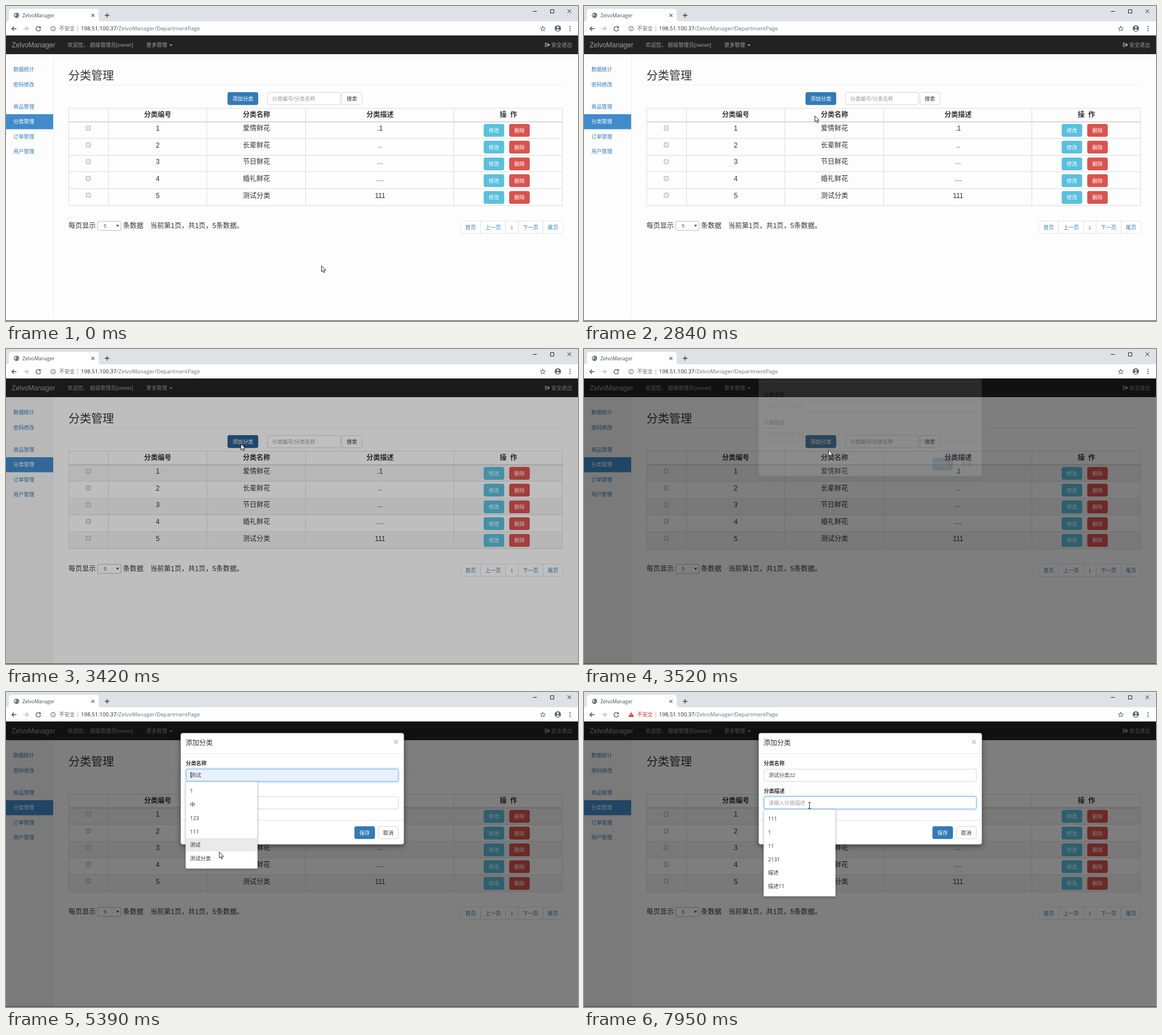
Animation of 1007x556 px, one loop 8000 ms. Source, as an HTML page:

```html
<!DOCTYPE html>
<html lang="zh-CN">
<head>
<meta charset="utf-8">
<title>分类管理</title>
<style>
html, body { margin: 0; width: 100%; height: 100%; overflow: hidden; background: #fdfdfd; }
svg { display: block; width: 100%; height: 100%; }
text { font-family: "Liberation Sans", "Noto Sans CJK SC", "Noto Sans CJK", sans-serif; white-space: pre; }
.ui { font-family: "Open Sans", "Noto Sans CJK SC", "Noto Sans CJK", sans-serif; }
.modal { filter: drop-shadow(0 3px 5px rgba(0,0,0,.45)); }
.focus { filter: drop-shadow(0 0 2px rgba(102,175,233,.8)); }
.list { filter: drop-shadow(0 1px 2px rgba(0,0,0,.3)); }
</style>
</head>
<body>
<svg id="stage" viewBox="0 0 1007 556"></svg>
<script>
const stage = document.getElementById('stage');
const LOOP = 8000, S = 9.2, H = 22.4, BLUE = '#337ab7';
const APP = 'ZelvoManager';

// Screen updates: [first, last, count]
const runs = [[0, 0, 1], [1180, 1750, 9], [1800, 1980, 3], [2040, 2490, 8], [2730, 3360, 10],
  [3420, 3520, 3], [3600, 3800, 4], [3870, 4370, 10], [4430, 4430, 1], [4860, 4860, 1],
  [5110, 5390, 6], [5450, 5510, 2], [5700, 6450, 14], [6530, 6650, 3], [6830, 7590, 13], [7780, 7950, 4]];
const ticks = runs.flatMap(([a, b, n]) =>
  Array.from({length: n}, (_, i) => Math.round(a + (n > 1 ? (b - a) * i / (n - 1) : 0))));

// Pointer path: [time, x, y]
const path = [[1110, 555, 458], [1750, 378, 327], [1900, 376, 324], [1980, 374, 312],
  [2490, 402, 209], [2660, 402, 209], [3000, 413, 167], [3430, 413, 167], [3520, 430, 178],
  [3800, 466, 257], [3980, 455, 294], [4370, 372, 146], [5050, 372, 146], [5390, 375, 282],
  [5510, 374, 291], [5680, 374, 291], [6450, 396, 148], [6770, 396, 148], [7250, 392, 196],
  [7590, 394, 198], [7720, 394, 198], [7950, 397, 200]];

const clamp = v => Math.max(0, Math.min(1, v));

function pointer(t) {
  const i = path.findIndex(p => p[0] > t);
  if (i === 0) return path[0].slice(1);
  if (i < 0) return path[path.length - 1].slice(1);
  const [t0, x0, y0] = path[i - 1], [t1, x1, y1] = path[i];
  const p = (t - t0) / (t1 - t0), e = p * p * (3 - 2 * p);
  return [x0 + (x1 - x0) * e, y0 + (y1 - y0) * e];
}

const rect = (x, y, w, h, fill, extra = '') =>
  `<rect x="${x}" y="${y}" width="${w}" height="${h}" fill="${fill}" ${extra}/>`;
const box = (x, y, w, h, fill, border, r = 2.6, extra = '') =>
  rect(x + .4, y + .4, w - .8, h - .8, fill, `stroke="${border}" stroke-width=".8" rx="${r}" ${extra}`);
const line = (d, color, width = 1, extra = '') =>
  `<path d="${d}" fill="none" stroke="${color}" stroke-width="${width}" ${extra}/>`;
const shape = (d, fill) => `<path d="${d}" fill="${fill}"/>`;
const text = (x, mid, size, str, fill = '#333', extra = '') =>
  `<text x="${x}" y="${mid + size * .37}" font-size="${size}" fill="${fill}" ${extra}>${str}</text>`;
const center = (x, mid, size, str, fill, extra = '') =>
  text(x, mid, size, str, fill, 'text-anchor="middle" ' + extra);
const button = (x, y, w, label, fill, border, color = '#fff') =>
  box(x, y, w, H, fill, border) + center(x + w / 2, y + H / 2, S, label, color);
const bold = 'font-weight="700"';

function browser(warn) {
  const ink = '#5f6368', dark = '#202124', red = '#d93025';
  const thin = 'stroke-linecap="round" stroke-linejoin="round"';
  return rect(0, 0, 1007, 28, '#dee1e6') + rect(0, 27, 1007, 25, '#fff') +
    shape('M1 27Q5 27 5 23V10Q5 5 10 5H158Q163 5 163 10V23Q163 27 167 27Z', '#fff') +
    `<circle cx="18.5" cy="16.5" r="4.6" fill="${ink}"/>` +
    shape('M15 14.5L18 13.5 19 15.5 17 17 17.5 19.5 15.5 18ZM20 16.5H22.2L20.5 19.5Z', '#e4e6e9') +
    text(29, 16.5, 8.5, APP, '#45494d', 'class="ui"') +
    line('M150.5 14L155.5 19M155.5 14L150.5 19', ink, 1.1) +
    line('M174 16.5H182M178 12.5V20.5', '#3c4043', 1.3) +
    line('M927.5 9.5H934.5M958.5 6.5H964.5V12.5H958.5ZM988.5 6L995 12.5M995 6L988.5 12.5', '#222') +
    line('M18.5 40H10.5M14 36.2L10.3 40 14 43.8', '#4a4e52', 1.3) +
    line('M31 40H39M35.5 36.2L39.2 40 35.5 43.8', '#b9bcc0', 1.3) +
    line('M60 37.6A4 4 0 1 0 60.8 41', '#4a4e52', 1.3) + shape('M61.2 35.5V39.2H57.5Z', '#4a4e52') +
    (warn ? shape('M83 35.5L87.8 44H78.2Z', red) + line('M83 38.3V41M83 42V43', '#fff')
      : `<circle cx="83" cy="40" r="4" fill="none" stroke="${ink}"/>` + line('M83 37.5V38.5M83 39.3V42.3', ink)) +
    text(93.5, 39.5, S, '不安全', warn ? red : ink, 'class="ui"') +
    line('M126.5 35V45', '#bbb') +
    text(132, 39.5, 9.6, `198.51.100.37<tspan fill="#6a6e72">/${APP}/DepartmentPage</tspan>`, dark, 'class="ui"') +
    line('M945 35.8L946.2 38.7 949.3 38.9 946.9 40.9 947.7 44 945 42.3 942.3 44 943.1 40.9 940.7 38.9 943.8 38.7Z', ink, 1, thin) +
    `<circle cx="971.5" cy="39.5" r="5.5" fill="${ink}"/><circle cx="971.5" cy="37.6" r="1.8" fill="#fff"/>` +
    shape('M968 42.4Q971.5 39.5 975 42.4Q971.5 45.2 968 42.4Z', '#fff') +
    [36.2, 39.8, 43.4].map(y => `<circle cx="993" cy="${y}" r="1.1" fill="${ink}"/>`).join('');
}

function navbar() {
  const c = '#9d9d9d';
  return rect(0, 52, 1007, 33, '#222') + text(10, 68.5, 12, APP, c) +
    text(108.5, 68.5, S, '欢迎您， 超级管理员[owner]', c) +
    text(247, 68.5, S, '更多管理', c) + shape('M287.5 68H293.5L290.5 71Z', c) +
    line('M952.5 65.5H949.5V71.5H952.5', c, 1.3) + shape('M951.5 67.3H954V65L958 68.5 954 72V69.7H951.5Z', c) +
    text(960, 68.5, S, '安全退出', c);
}

function sidebar(tinted) {
  const items = [['数据统计', 112], ['密码修改', 138.5], ['商品管理', 178], ['分类管理', 204], ['订单管理', 230.5], ['用户管理', 257]];
  return rect(0, 85, 83, 470, tinted ? '#f5f5f5' : '#fdfdfd') + rect(83, 85, 1, 470, '#eee') +
    rect(0, 191, 83, 26.5, '#428bca') +
    items.map(([s, y]) => text(13, y, S, s, y === 204 ? '#fff' : BLUE)).join('');
}

function table(hover, striped) {
  const top = 204.5, step = 29.6, mids = [267, 441, 658.5];
  const rows = [['爱情鲜花', '.1'], ['长辈鲜花', '..'], ['节日鲜花', '...'], ['婚礼鲜花', '....'], ['测试分类', '111']];
  const heads = ['分类编号', '分类名称', '分类描述'].map((s, i) => center(mids[i], 191.5, 12, s, '#333', bold)).join('');
  const body = rows.map((row, i) => {
    const y = top + i * step, mid = y + 11.3;
    const tinted = i === hover || striped && i % 2 === 0;
    return (tinted ? rect(110, y, 870, step, '#f4f4f4') : '') +
      line(`M110 ${Math.round(y + step) - .5}H980`, '#ddd') +
      box(140.7, mid - 4.3, 8.3, 8.3, '#ececec', '#999', 1) +
      [i + 1, ...row].map((s, k) => center(mids[k], mid, 12, s)).join('') +
      button(841, y + 3.8, 36, '修改', '#5bc0de', '#46b8da') +
      button(886, y + 3.8, 36, '删除', '#d9534f', '#d43f3a');
  }).join('');
  return heads + center(884.5, 191.5, 12, '操&#160; 作', '#333', bold) + body +
    line('M110.5 180V353M180.5 180V353M353.5 180V353M527.5 180V353M788.5 180V353M979.5 180V353M110 180.5H980', '#ddd') +
    line('M110 204.5H980', '#ccc', 1.3);
}

function footer() {
  const pages = [['首页', 818], ['上一页', 857.5], ['1', 890.5], ['下一页', 923.5], ['尾页', 963]];
  return text(110, 387.3, 12, '每页显示') + box(161, 379.7, 42, 16.8, '#fff', '#aaa', 2) +
    text(172, 387.8, S, '5', '#555') + shape('M194 386.2H199L196.5 390Z', '#444') +
    text(206, 387.3, 12, '条数据') + text(254, 387.3, 12, '当前第1页，共1页，5条数据。') +
    box(800, 379.3, 181, H, '#fff', '#ddd') + line('M835.5 379.5V401.5M879.5 379.5V401.5M901.5 379.5V401.5M945.5 379.5V401.5', '#ddd') +
    pages.map(([s, x]) => center(x, 390.5, S, s, s === '1' ? '#777' : BLUE)).join('');
}

function page(t, hover, dim) {
  const active = t >= 2940;
  return rect(0, 52, 1007, 504, '#fdfdfd') + navbar() + sidebar(dim) +
    text(110, 122.5, 20, '分类管理') + rect(110, 139, 870, 1, '#eee') +
    button(390, 152.2, 54, '添加分类', active ? '#286090' : BLUE, active ? '#204d74' : '#2e6da4') +
    box(460, 152.2, 129, H, '#fff', '#ccc') + text(468.5, 163.5, S, '分类编号/分类名称', '#999') +
    button(591, 152.2, 36, '搜索', '#fff', '#ccc', '#333') +
    table(hover, dim) + footer();
}

const names = ['1', '中', '123', '111', '测试', '测试分类'];
const notes = ['111', '1', '11', '2131', '描述', '描述11'];
const ITEM = 23.7;

function field(y, value, hint, focused, filled) {
  return box(316.8, y, 374.2, H, filled ? '#e8f0fe' : '#fff', focused ? '#66afe9' : '#ccc', 2.6, focused ? 'class="focus"' : '') +
    text(325, y + H / 2, S, value || hint, value ? '#444' : '#999');
}

function dropdown(y, items, picked) {
  return `<g class="list">${box(316, y, 127, 154, '#fff', '#d8d8d8', 1.5)}</g>` +
    (picked >= 0 ? rect(317, y + 5 + picked * ITEM, 125, ITEM, '#e8eaeb') : '') +
    items.map((s, i) => text(324, y + 17 + i * ITEM, S, s, '#333', 'class="ui"')).join('');
}

function modal(t, picked) {
  const first = t >= 4430 && t < 7220, second = t >= 7220, chosen = t >= 5700;
  const value = t >= 6590 ? '测试分类22' : t >= 6530 ? '测试分类2' : chosen ? names[5] : names[picked] || '';
  const base = t < 5110 ? 4360 : second ? 7430 : 5200;
  const width = [...value].reduce((w, c) => w + (c > '~' ? S : S * .556), 0);
  const caretX = 325.5 + (first && chosen ? width : 0), caretY = second ? 190 : 141;
  const drop = -50 * (1 - clamp((t - 3505) / 290)) ** 2;
  return `<g opacity="${clamp((t - 3505) / 150)}" transform="translate(0 ${drop})">` +
    `<g class="modal">${box(307, 72, 394, 197.5, '#fff', '#8a8a8a', 4)}</g>` +
    text(316, 90, 12, '添加分类') + center(686.5, 88, 14, '×', '#bbb', bold) +
    rect(308, 108, 392, 1, '#e5e5e5') + rect(308, 226, 392, 1, '#e5e5e5') +
    text(316.5, 126, S, '分类名称', '#333', bold) + text(316.5, 174.5, S, '分类描述', '#333', bold) +
    field(135.8, value, '请输入分类名称', first, value && t < 6530) +
    field(184.3, '', '请输入分类描述', second) +
    button(613.5, 237, 36, '保存', BLUE, '#2e6da4') + button(655, 237, 36, '取消', '#fff', '#ccc', '#333') +
    ((first || second) && (t - base) % 1000 < 500 ? rect(caretX - .5, caretY, 1, 11, '#222') : '') +
    (t >= 5110 && !chosen ? dropdown(158, names, picked) : '') +
    (t >= 7460 ? dropdown(207, notes, -1) : '') + '</g>';
}

function cursor(t, x, y) {
  const inField = t > 3800 && x > 317 && x < 691 && (y > 136 && y < 158 || y > 184.5 && y < 207);
  const art = inField
    ? line('M-2.5 -5H-.8L0 -4.4 .8 -5H2.5M0 -4.4V4.9M-2.5 5.5H-.8L0 4.9 .8 5.5H2.5', '#222')
    : '<path d="M.5 .5V11L3 8.8 4.7 12.6 6.4 11.9 4.8 8.2H8Z" fill="#fff" stroke="#111" stroke-width=".9"/>';
  return `<g transform="translate(${x} ${y})">${art}</g>`;
}

function scene(t) {
  const [x, y] = pointer(t), lagY = pointer(t - 60)[1];
  const shade = clamp((t - 3345) / 150) * .5;
  const hover = shade || lagY < 204.5 ? -1 : Math.floor((lagY - 204.5) / 29.6);
  const picked = t >= 5110 && t < 5700 && lagY > 163 ? Math.min(5, Math.floor((lagY - 163) / ITEM)) : -1;
  return page(t, hover, shade > 0) + rect(0, 52, 1007, 504, '#000', `opacity="${shade}"`) +
    (t > 3505 ? modal(t, picked) : '') + rect(0, 555, 1007, 1, '#444') +
    browser(t >= 6530) + cursor(t, x, y);
}

let shown = -1;
function frame(now) {
  const t = now % LOOP;
  const tick = ticks.filter(k => k <= t).pop();
  if (tick !== shown) stage.innerHTML = scene(shown = tick);
  requestAnimationFrame(frame);
}
requestAnimationFrame(frame);
</script>
</body>
</html>
```
